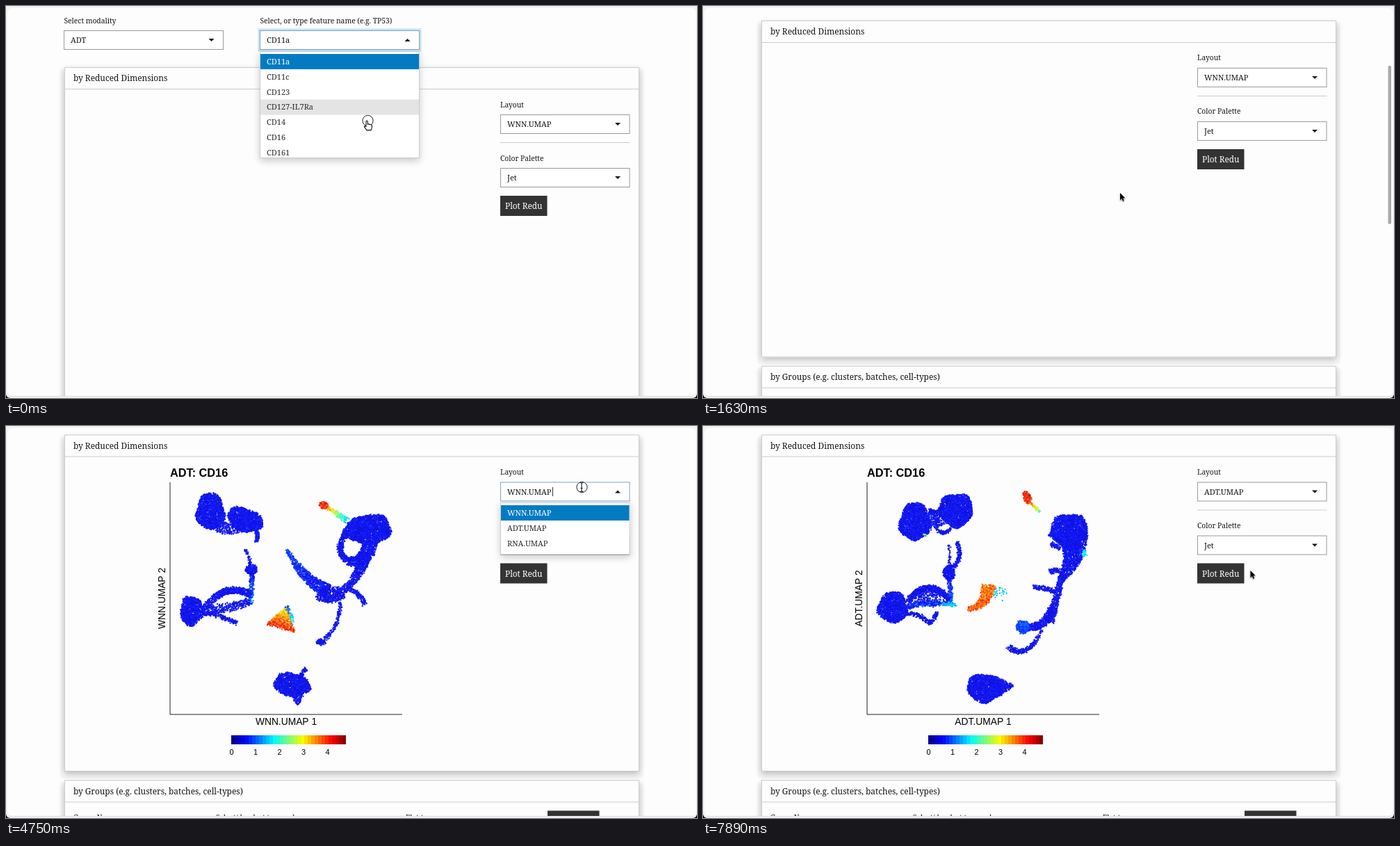
These frames come from a looping animation (994 by 564 pixels, 8 s). An HTML page with a canvas:

```html
<!DOCTYPE html>
<html>
<head>
<meta charset="utf-8">
<style>
html, body { margin: 0; width: 100%; height: 100%; overflow: hidden; background: #f5f5f5; }
canvas { display: block; }
</style>
</head>
<body>
<canvas id="stage" width="994" height="564"></canvas>
<script>
const LOOP = 8000, STEP = 148.2, LAST = 53;
const SERIF = '"Noto Serif", serif', SANS = '"Liberation Sans", Arial, sans-serif';
const ctx = document.getElementById('stage').getContext('2d');
const clamp = v => Math.max(0, Math.min(1, v));

function text(s, x, y, size = 10.3, color = '#151515', c = ctx, family = SERIF, style = '') {
  c.font = `${style} ${size}px ${family}`;
  c.fillStyle = color;
  c.fillText(s, x, y);
}
function rect(x, y, w, h, fill, radius = 0) {
  ctx.fillStyle = fill;
  ctx.beginPath();
  ctx.roundRect(x, y, w, h, radius);
  ctx.fill();
}
function frame(x, y, w, h, color) {
  ctx.strokeStyle = color;
  ctx.lineWidth = 1;
  ctx.strokeRect(x + .5, y + .5, w - 1, h - 1);
}
function shadow(color, blur, dy) {
  ctx.shadowColor = color;
  ctx.shadowBlur = blur;
  ctx.shadowOffsetY = dy;
}

// ---------- scatter plots ----------
function jet(v, floor = 0) {
  const part = k => floor + (250 - floor) * clamp(1.5 - Math.abs(4 * v / 4.78 - k));
  return `rgb(${part(3)},${part(2)},${part(1)})`;
}

function makePlot(name, seed, draw) {
  const cv = document.createElement('canvas');
  cv.width = 994;
  cv.height = 564;
  const c = cv.getContext('2d');
  const rnd = () => (seed = (seed * 16807) % 2147483647) / 2147483647;
  const spread = w => (rnd() - .5) * w;

  function dot(x, y, v) {
    c.fillStyle = jet(v + spread(.3 + v * .15), 18);
    c.beginPath();
    c.arc(x + spread(2.2), y + spread(2.2), 1.15, 0, 7);
    c.fill();
  }
  // Cloud of dots in an uneven ellipse
  function blob(x, y, rx, ry, tilt = 0, v = .56, density = 1.15) {
    const phase = rnd() * 6;
    for (let n = Math.PI * rx * ry * density; n > 0; n--) {
      const a = rnd() * Math.PI * 2;
      const r = Math.sqrt(rnd()) * (1 + .06 * Math.sin(3 * a + phase) + .05 * Math.sin(5 * a));
      const u = rx * r * Math.cos(a), w = ry * r * Math.sin(a);
      dot(x + u * Math.cos(tilt) - w * Math.sin(tilt), y + u * Math.sin(tilt) + w * Math.cos(tilt), v);
    }
  }
  // Dots along a bent line whose width and value run from one end to the other
  function trail(x0, y0, x1, y1, x2, y2, w0, w1 = w0, v0 = .56, v1 = v0, density = .75) {
    const length = Math.hypot(x1 - x0, y1 - y0) + Math.hypot(x2 - x1, y2 - y1);
    const wide = Math.max(w0, w1);
    for (let n = length * wide * density; n > 0; n--) {
      const f = rnd(), g = 1 - f, w = w0 + (w1 - w0) * f;
      if (rnd() * wide > w) continue;
      const dx = g * (x1 - x0) + f * (x2 - x1), dy = g * (y1 - y0) + f * (y2 - y1);
      const side = spread(w) / Math.hypot(dx, dy);
      dot(g * g * x0 + 2 * f * g * x1 + f * f * x2 - dy * side,
        g * g * y0 + 2 * f * g * y1 + f * f * y2 + dx * side, v0 + (v1 - v0) * f);
    }
  }
  draw(blob, trail);

  c.strokeStyle = '#222';
  c.beginPath();
  c.moveTo(236, 81);
  c.lineTo(236, 415);
  c.lineTo(570, 415);
  c.stroke();
  text('ADT: CD16', 236, 72.5, 16.3, '#000', c, SANS, 'bold');
  c.textAlign = 'center';
  text(name + ' 1', 403, 429.5, 13.8, '#000', c, SANS);
  c.save();
  c.translate(229, 248);
  c.rotate(-Math.PI / 2);
  text(name + ' 2', 0, 0, 13.8, '#000', c, SANS);
  c.restore();
  for (let i = 0; i < 33; i++) {
    c.fillStyle = jet((i + .5) / 33 * 4.78);
    c.fillRect(324 + i * 5, 445, 5, 13);
  }
  for (let i = 0; i < 5; i++) text(i, 324.5 + i * 34.5, 473, 11, '#000', c, SANS);
  return cv;
}

const wnnPlot = makePlot('WNN.UMAP', 11, (blob, trail) => {
  // upper left pair
  blob(294, 123, 20, 26);
  blob(344, 135, 26, 16, .35);
  trail(302, 142, 318, 152, 338, 146, 18, 14, .56, .56, .4);
  trail(360, 150, 364, 160, 360, 167, 5);
  // middle left
  trail(344, 178, 352, 190, 351, 204, 3);
  blob(353, 207, 8, 7);
  trail(354, 210, 354, 230, 352, 256, 6, 5, .5, 1.3);
  blob(267, 266, 16, 21);
  trail(284, 264, 315, 222, 353, 243, 9);
  trail(284, 266, 320, 264, 352, 252, 16, 10, .56, .56, .4);
  trail(286, 268, 315, 275, 332, 284, 5);
  // high values
  trail(404, 262, 399, 276, 395, 291, 4, 42, 2.9, 4.1);
  trail(404, 260, 410, 272, 413, 284, 5, 4, .8, 2, .4);
  blob(457, 114, 6, 5, 0, 4.1);
  trail(462, 117, 474, 124, 491, 137, 4, 8, 3.6, 1.5);
  // right side
  blob(521, 149, 34, 21, -.05);
  trail(488, 156, 472, 182, 492, 194, 8);
  trail(492, 194, 520, 200, 524, 166, 12, 22);
  trail(516, 182, 516, 208, 484, 238, 18, 9);
  trail(404, 178, 410, 188, 420, 204, 3, 9, .9, .8);
  trail(418, 200, 436, 226, 464, 238, 10, 20, .8, .56);
  blob(467, 243, 20, 11, -.1, .56, .7);
  trail(492, 234, 508, 238, 516, 257, 5, 7);
  trail(481, 248, 482, 290, 455, 309, 4, 5, .56, .56, .5);
  blob(453, 311, 6, 4);
  // bottom
  blob(411, 372, 26, 16, .12);
  trail(418, 380, 420, 390, 421, 400, 24, 5);
  trail(424, 360, 428, 353, 431, 349, 5);
});

const adtPlot = makePlot('ADT.UMAP', 29, (blob, trail) => {
  // upper left pair
  blob(305, 138, 22, 27);
  blob(364, 121, 24, 24);
  trail(322, 132, 334, 136, 346, 130, 28, 22, .56, .56, .5);
  trail(334, 146, 346, 160, 356, 148, 4);
  trail(316, 157, 320, 158, 325, 160, 3, 3, 2, 2.8, .2);
  // middle left
  trail(354, 172, 356, 186, 354, 202, 3, 3, .56, .56, .4);
  trail(366, 167, 374, 190, 360, 204, 5);
  blob(354, 211, 8, 11);
  trail(354, 220, 357, 240, 356, 257, 5, 5, .56, 1.1);
  blob(273, 261, 21, 22);
  trail(294, 254, 322, 214, 355, 250, 8);
  trail(294, 260, 326, 252, 366, 258, 8, 4, .56, 1.6);
  trail(290, 270, 312, 268, 326, 284, 5);
  trail(326, 284, 334, 278, 336, 268, 5);
  blob(328, 248, 25, 11, 0, .56, .3);
  // high values
  trail(382, 264, 408, 260, 411, 229, 5, 20, 3.8, 3.7);
  blob(428, 241, 10, 9, 0, 1.6, .1);
  blob(466, 103, 5, 9, -.4, 4.1);
  trail(470, 110, 478, 117, 484, 123, 4, 3, 3.7, 2.2);
  // right side
  blob(527, 151, 26, 25);
  trail(532, 158, 540, 190, 515, 220, 42, 10);
  trail(499, 155, 505, 158, 512, 160, 7);
  trail(501, 170, 506, 172, 514, 176, 6);
  trail(499, 210, 506, 208, 516, 208, 7);
  trail(547, 180, 549, 183, 550, 187, 6, 6, 1.8);
  trail(517, 214, 510, 240, 499, 282, 7, 12);
  trail(475, 233, 490, 231, 506, 239, 6);
  trail(462, 290, 492, 292, 503, 264, 9, 13);
  blob(460, 289, 9, 9, 0, .9);
  trail(488, 292, 466, 340, 439, 317, 4, 8, .56, .56, .5);
  // bottom
  blob(405, 377, 25, 20, .05);
  trail(420, 376, 433, 375, 446, 374, 32, 4);
});

// ---------- page ----------
function select(x, y, w, value, open, focus) {
  rect(x, y, w, 28, '#fff');
  frame(x, y, w, 28, focus ? '#7fa4c4' : '#999');
  text(value, x + 10, y + 18, 11);
  const cx = x + w - 17.5, d = open ? -2 : 2;
  ctx.beginPath();
  ctx.moveTo(cx - 4, y + 14 - d);
  ctx.lineTo(cx + 4, y + 14 - d);
  ctx.lineTo(cx, y + 14 + d);
  ctx.fill();
}

function menu(x, y, w, h, items, hover) {
  ctx.save();
  shadow('rgba(0,0,0,.2)', 10, 4);
  rect(x, y, w, h, '#fff');
  shadow('transparent', 0, 0);
  frame(x, y, w, h, '#ccc');
  ctx.beginPath();
  ctx.rect(x, y, w, h - 1);
  ctx.clip();
  items.forEach((s, i) => {
    const top = y + 4 + i * 21.8;
    if (i == 0) rect(x + 1, top, w - 2, 22, '#027bc3');
    else if (i == hover) rect(x + 1, top, w - 2, 22, '#e4e4e4');
    text(s, x + 10, top + 15, 11, i ? '#2a2a2a' : '#fff');
  });
  ctx.restore();
}

function card(y, h, title) {
  rect(78, y + 2, 839, h + 8, '#f6f6f6', 5);
  ctx.save();
  shadow('rgba(0,0,0,.25)', 9, 4);
  rect(84, y, 827, h, '#fdfdfd');
  ctx.restore();
  frame(84, y, 827, h, '#ccc');
  rect(84, y + 31, 827, 1, '#ccc');
  text(title, 97, y + 20, 11.9);
}

function spinner(angle) {
  ctx.strokeStyle = '#aaa';
  ctx.lineWidth = 1.6;
  for (const a of [angle, angle + Math.PI]) {
    ctx.beginPath();
    ctx.arc(395, 270, 15, a - .76, a + .76);
    ctx.stroke();
  }
}

// ---------- pointer ----------
const ARROW = new Path2D('M0 0V10.2L2.4 8L4 11.7L5.7 10.9L4.1 7.3H7.2Z');
const HAND = new Path2D('M-2 1.2Q-2 0-.9 0T.3 1.2V5.2Q1.8 4.3 2.6 5.5Q4.2 4.8 4.8 6Q6.5 5.6 6.5 7.6Q6.6 11 5 13.6H-1.4Q-2.8 11-4.6 8.8Q-4.8 7-2 8.6Z');
const BEAM = new Path2D('M-2.5-6.5Q0-6.5 0-5Q0-6.5 2.5-6.5M0-5V5M-2.5 6.5Q0 6.5 0 5Q0 6.5 2.5 6.5M-1.5 1.5H1.5');

// Each move: first step, last step, where it ends
const moves = [
  [0, 3, 521, 186], [6, 9, 600, 269], [13, 16, 739.5, 231], [16, 19, 744, 221], [19, 21, 740, 229],
  [28, 32, 828, 88], [32, 36, 770, 146], [37, 42, 760, 202], [43, 48, 740, 329], [49, 53, 787.5, 208]
];
const clicks = [0, 3, 19, 32, 36, 42, 43];

function pointerAt(n) {
  let x = 520, y = 165;
  for (const [from, to, tx, ty] of moves) {
    const p = clamp((n - from) / (to - from)), ease = p * p * (3 - 2 * p);
    x += (tx - x) * ease;
    y += (ty - y) * ease;
  }
  return [x, y];
}

function drawPointer(x, y, shape, pressed) {
  ctx.save();
  ctx.translate(x, y);
  ctx.lineJoin = 'round';
  if (pressed) {
    ctx.beginPath();
    ctx.arc(.5, 0, 7.6, 0, 7);
    ctx.strokeStyle = 'rgba(255,255,255,.8)';
    ctx.lineWidth = 2.4;
    ctx.stroke();
    ctx.strokeStyle = '#222';
    ctx.lineWidth = 1;
    ctx.stroke();
  }
  ctx.strokeStyle = shape == ARROW ? '#fff' : '#111';
  ctx.lineWidth = 1.1;
  if (shape == ARROW) {
    shadow('rgba(0,0,0,.3)', 2, 1);
    ctx.stroke(shape);
    ctx.fillStyle = '#000';
    ctx.fill(shape);
  } else {
    ctx.fillStyle = '#fff';
    if (shape == HAND) ctx.fill(shape);
    ctx.stroke(shape);
  }
  ctx.restore();
}

const features = ['CD11a', 'CD11c', 'CD123', 'CD127-IL7Ra', 'CD14', 'CD16', 'CD161'];
const layouts = ['WNN.UMAP', 'ADT.UMAP', 'RNA.UMAP'];

function render(n) {
  const during = (from, to) => n >= from && n < to;
  const scroll = 75.5 * (1 - (1 - clamp((n - 9) / 3)) ** 2);
  const featureOpen = n < 4, layoutOpen = during(32, 38);
  const pressing = during(17, 30) || during(41, 45);
  const [px, py] = pointerAt(n);
  const over = (x, y, w, h) => px >= x && px < x + w && py >= y && py < y + h;

  rect(0, 0, 994, 564, '#000');
  rect(0, -10, 994, 574, '#f2f2f2', 6);
  rect(5, 561, 984, 1, '#ddd');
  ctx.save();
  ctx.beginPath();
  ctx.roundRect(2, 3, 990.5, 558, 7);
  ctx.clip();
  rect(0, 0, 994, 564, '#fdfdfd');

  ctx.save();
  ctx.translate(0, -scroll);
  text('Select modality', 83.5, 24.5);
  text('Select, or type feature name (e.g. TP53)', 365.5, 24.5);
  card(88, 484.5, 'by Reduced Dimensions');
  select(83, 35, 230, 'ADT');
  rect(362.5, 32.5, 235, 33, '#c4e2f5');
  select(365, 35, 230, features[featureOpen ? 0 : 5], featureOpen, true);

  text('Layout', 711, 145.5);
  select(711, 156, 186.5, layouts[n < 38 ? 0 : 1], layoutOpen, during(32, 44));
  rect(711, 196, 186.5, 1, '#ccc');
  text('Color Palette', 711, 222.5);
  select(711, 233, 186.5, 'Jet');
  rect(711, 273, 67.5, 29, pressing ? '#282828' : '#333');
  text('Plot Redu', 718, 292, 11.8, '#fff');

  card(585, 300, 'by Groups (e.g. clusters, batches, cell-types)');
  text('Group Name', 97, 642);
  text('Select/deselect to reorder', 302, 642);
  text('Plot type', 575, 642);
  rect(779, 629, 74.5, 30, '#333');
  ctx.restore();

  if (during(26, 43)) ctx.drawImage(wnnPlot, 0, 0);
  if (n >= 48) ctx.drawImage(adtPlot, 0, 0);
  if (during(20, 26)) spinner((n - 20) * .954);
  if (during(43, 48)) spinner((n - 43) * .954);

  if (featureOpen) menu(365, 65, 230, 154, features, 3 + Math.min(n, 2));
  if (layoutOpen) {
    menu(711, 110, 186.5, 75, layouts, Math.floor((py - 114) / 21.8));
    if (n < 36) rect(786, 88, 1, 13, '#333');
  }
  if (during(10, 17)) rect(985.5, 59 + scroll * .4, 4.5, 228, '#aaa', 2.2);

  const onItem = featureOpen || layoutOpen && over(711, 114, 187, 70);
  const onButton = scroll && over(711, 198, 67, 29);
  const onField = scroll && over(711, 80, 187, 28);
  const shape = onItem || onButton ? HAND : onField ? BEAM : ARROW;
  drawPointer(px, py, shape, clicks.includes(n));
  ctx.restore();
}

function tick() {
  const t = performance.now() % LOOP;
  render(Math.min(LAST, Math.floor((t + 10) / STEP)));
  requestAnimationFrame(tick);
}
tick();
</script>
</body>
</html>
```
